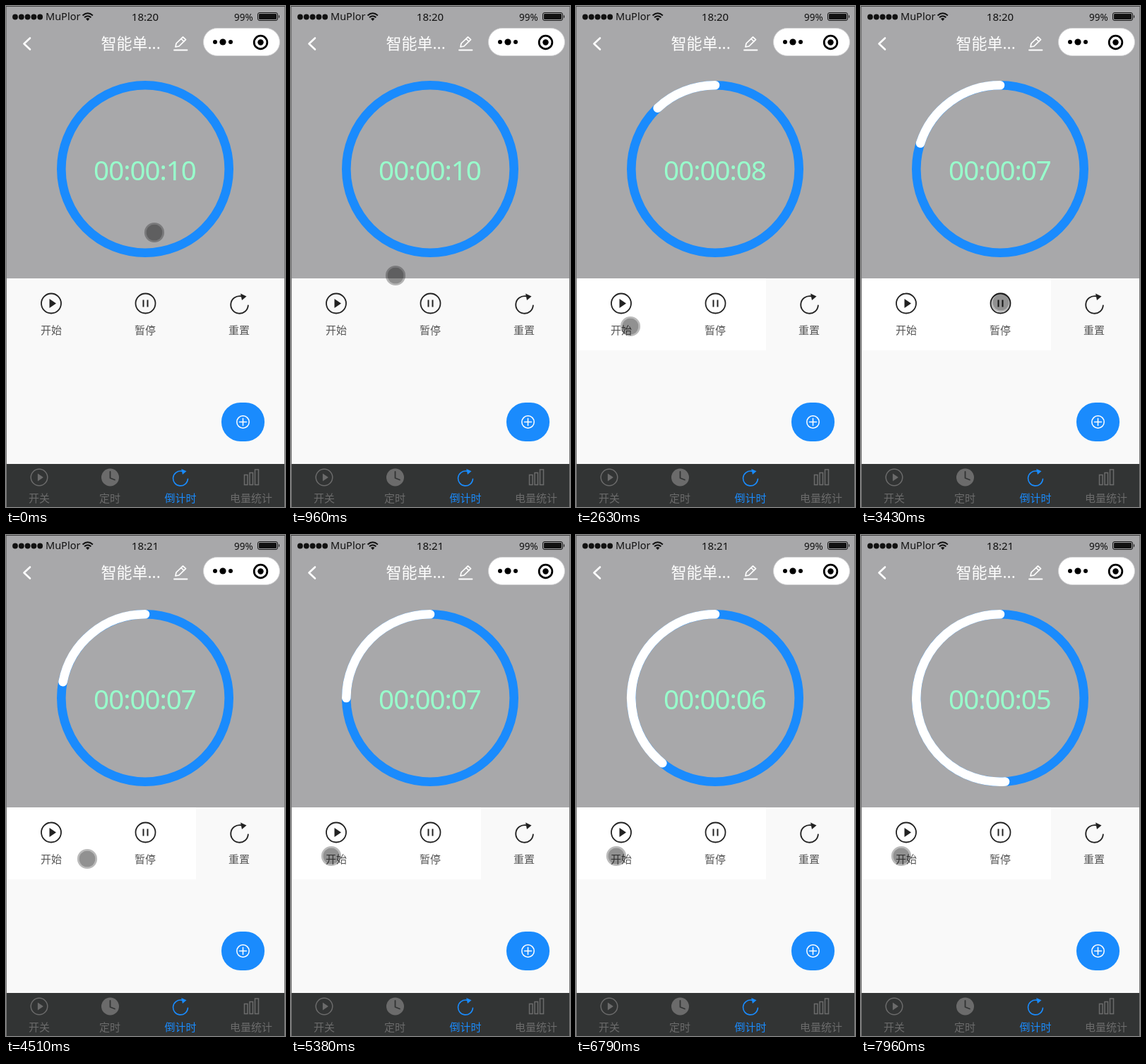
These frames come from a looping animation (395 px wide and 710 px high, 8000 ms). An HTML page:

```html
<!DOCTYPE html>
<html lang="zh">
<head>
<meta charset="utf-8">
<title>倒计时</title>
<style>
html, body { margin: 0; width: 100%; height: 100%; overflow: hidden; background: #f9f9f9; }
svg { display: block; width: 100vw; height: 100vh; }
text { font-family: "Noto Sans CJK SC", "Noto Sans CJK", sans-serif; font-size: 15px; }
.lat { font-family: "Noto Sans", "Open Sans", sans-serif; }
.mid { text-anchor: middle; }
.line { fill: none; stroke-linecap: round; stroke-linejoin: round; }
</style>
</head>
<body>
<svg viewBox="0 0 395 710" xmlns="http://www.w3.org/2000/svg">
  <defs>
    <g id="play">
      <circle r="14" fill="none" stroke="currentColor" stroke-width="1.8"/>
      <path d="M-2.5-6.5 7 0-2.5 6.5Z" fill="currentColor"/>
    </g>
    <g id="reset">
      <path d="M2-12.2A12.3 12.3 0 1 0 12.3 1" fill="none" stroke="currentColor" stroke-width="1.9" stroke-linecap="round"/>
      <path d="M1.5-16 10-12 3.5-6.5Z" fill="currentColor"/>
    </g>
  </defs>

  <rect width="395" height="710" fill="#f9f9f9"/>
  <rect width="395" height="386" fill="#a8a8aa"/>
  <rect id="row" x="1" y="386" width="268" height="102" fill="#fff"/>

  <!-- status bar -->
  <g fill="#111">
    <g id="signal"></g>
    <text class="lat" x="56" y="20" style="font-size:14.5px">MuPlor</text>
    <text id="clock" class="lat mid" x="197" y="20.5">18:20</text>
    <text class="lat" x="323" y="20.5" style="font-size:13.5px">99%</text>
    <path d="M115.7 21 113 18Q115.7 15.8 118.4 18Z"/>
    <g class="line" stroke="#111" stroke-width="2" style="stroke-linecap:butt">
      <path d="M108.5 13.4Q115.7 7.2 122.9 13.4M111 16.2Q115.7 12.2 120.4 16.2"/>
    </g>
    <rect x="356.5" y="9.5" width="28" height="11" rx="2.5" fill="none" stroke="#111"/>
    <rect x="358" y="11" width="25" height="8" rx="1.2"/>
    <path d="M386 12.5Q388.5 15 386 17.5Z"/>
  </g>

  <!-- title bar -->
  <g class="line" stroke="#fff">
    <path d="M34 45.5 25.5 53.5 34 61.5" stroke-width="2.6"/>
    <path d="M238 62.5H256.5" stroke-width="1.8"/>
    <path d="M240 58 241 53 250.5 43.8 254.5 47.6 245 57ZM248 46.5 252 50.3" stroke-width="1.7"/>
  </g>
  <text x="134.500" y="61" fill="#fff" style="font-size:22px">智能单...</text>
  <rect x="279.500" y="31.500" width="108" height="39" rx="19.5" fill="#fff" stroke="#d2d2d4"/>
  <circle cx="296" cy="51" r="3"/>
  <circle cx="307" cy="51" r="4.600"/>
  <circle cx="318" cy="51" r="3"/>
  <circle cx="360.500" cy="51.500" r="9.300" fill="none" stroke="#000" stroke-width="2.800"/>
  <circle cx="360.500" cy="51.500" r="4.200"/>

  <!-- countdown -->
  <circle cx="197" cy="231" r="118.7" fill="none" stroke="#1a8bfd" stroke-width="12.6"/>
  <path id="arc" class="line" stroke="#fff" stroke-width="12.6"/>
  <text id="count" class="lat mid" x="196.500" y="246.500" fill="#98ffcc" style="font-size:38.5px;letter-spacing:-1px">00:00:10</text>

  <!-- controls -->
  <g color="#222">
    <use href="#play" x="64" y="421.500"/>
    <circle cx="197.500" cy="421.500" r="14" fill="none" stroke="#222" stroke-width="1.8"/>
    <path d="M194.500 416.500V426.500M200.500 416.500V426.500" stroke="#222" stroke-width="2"/>
    <use href="#reset" x="330.500" y="423.500"/>
  </g>
  <g class="mid" fill="#555">
    <text x="64" y="465">开始</text>
    <text x="197" y="465">暂停</text>
    <text x="330" y="465">重置</text>
  </g>
  <rect x="305" y="562" width="61" height="55" rx="27" fill="#1a8bfd"/>
  <g class="line" stroke="#fff" stroke-width="1.500">
    <circle cx="335.500" cy="589.500" r="8.700"/>
    <path d="M330.500 589.500H340.500M335.500 584.500V594.500"/>
  </g>

  <!-- tab bar -->
  <rect y="649" width="395" height="61" fill="#323434"/>
  <g color="#6b6b6b" fill="#6b6b6b">
    <use href="#play" transform="translate(47 668) scale(.84)"/>
    <circle cx="147.500" cy="668" r="12.500"/>
    <path class="line" d="M147.500 660V669L154 671.500" stroke="#323434" stroke-width="1.800"/>
    <path d="M337.500 664.500H342V678.500H337.500ZM345 661.500H349.500V678.500H345ZM352.500 657H357.500V678.500H352.500Z" fill="none" stroke="#6b6b6b" stroke-width="1.500"/>
    <g class="mid">
      <text x="47" y="703">开关</text>
      <text x="147" y="703">定时</text>
      <text x="347" y="703">电量统计</text>
    </g>
  </g>
  <g color="#1a8bfd" fill="#1a8bfd">
    <use href="#reset" transform="translate(247 669.500) scale(.85)"/>
    <text class="mid" x="247" y="703">倒计时</text>
  </g>

  <path d="M.5 0V710M394.500 0V710" stroke="#777" fill="none"/>
  <path d="M0 .5H395" stroke="#444"/>

  <g id="cursor">
    <circle r="12.800" fill="none" stroke="#000" stroke-opacity=".27" stroke-width="2.600"/>
    <circle r="11.500" fill="#000" fill-opacity=".43"/>
  </g>
</svg>
<script>
const LOOP = 8000, STEP = 120;
const $ = id => document.getElementById(id);

// screen refreshes: [start, count], STEP ms apart
const runs = [
  [0, 1], [960, 1], [1090, 1], [1370, 2], [1640, 5], [2270, 4], [2770, 4],
  [3280, 1], [3430, 3], [3950, 1], [4510, 4], [5020, 4], [5530, 3],
  [5920, 4], [6430, 4], [6940, 3], [7330, 2], [7600, 4]
];
// pointer: [time, x, y], no position means hidden
const pointer = [
  [0, 210, 321], [960, 148, 382], [1090], [1370, 63, 422], [1490, 77, 454],
  [3280, 174, 455], [3430, 198, 420], [3950, 198, 456], [4510, 115, 459],
  [4630, 75, 457], [4750, 57, 456], [5020, 57, 455]
];
const counts = [[0, "10"], [1640, "09"], [2510, "08"], [3430, "07"], [5920, "06"], [6940, "05"]];

const latest = (list, t) => list.filter(k => k[0] <= t).pop();

function refresh(t) {
  const [start, n] = latest(runs, t);
  return start + STEP * Math.min(n - 1, Math.floor((t - start) / STEP));
}

// degrees used up, held while paused
function angle(t) {
  if (t < 1640) return 0;
  if (t < 2630) return 3.6 + (t - 1640) * 0.0401;
  if (t < 5020) return Math.min(78.9, 43.3 + (t - 2630) * 0.036);
  return Math.max(78.9, 90 + (t - 5380) * 0.0362);
}

function arcPath(deg) {
  if (!deg) return "";
  const a = deg * Math.PI / 180, r = 118.7;
  const x = 197 - r * Math.sin(a), y = 231 - r * Math.cos(a);
  return `M197 ${231 - r}A${r} ${r} 0 ${deg > 180 ? 1 : 0} 0 ${x} ${y}`;
}

function draw(time) {
  const t = refresh(time);
  $("arc").setAttribute("d", arcPath(angle(t)));
  $("count").textContent = "00:00:" + latest(counts, t)[1];
  $("clock").textContent = t < 3550 ? "18:20" : "18:21";
  $("row").style.display = t < 1640 ? "none" : "";
  const [, x, y] = latest(pointer, t);
  $("cursor").style.display = x === undefined ? "none" : "";
  if (x !== undefined) $("cursor").setAttribute("transform", `translate(${x} ${y})`);
}

for (let i = 0; i < 5; i++) {
  $("signal").innerHTML += `<circle cx="${13 + i * 8.8}" cy="15.500" r="3.900"/>`;
}

const t0 = performance.now();
function tick() {
  draw((performance.now() - t0) % LOOP);
  requestAnimationFrame(tick);
}
tick();
</script>
</body>
</html>
```
